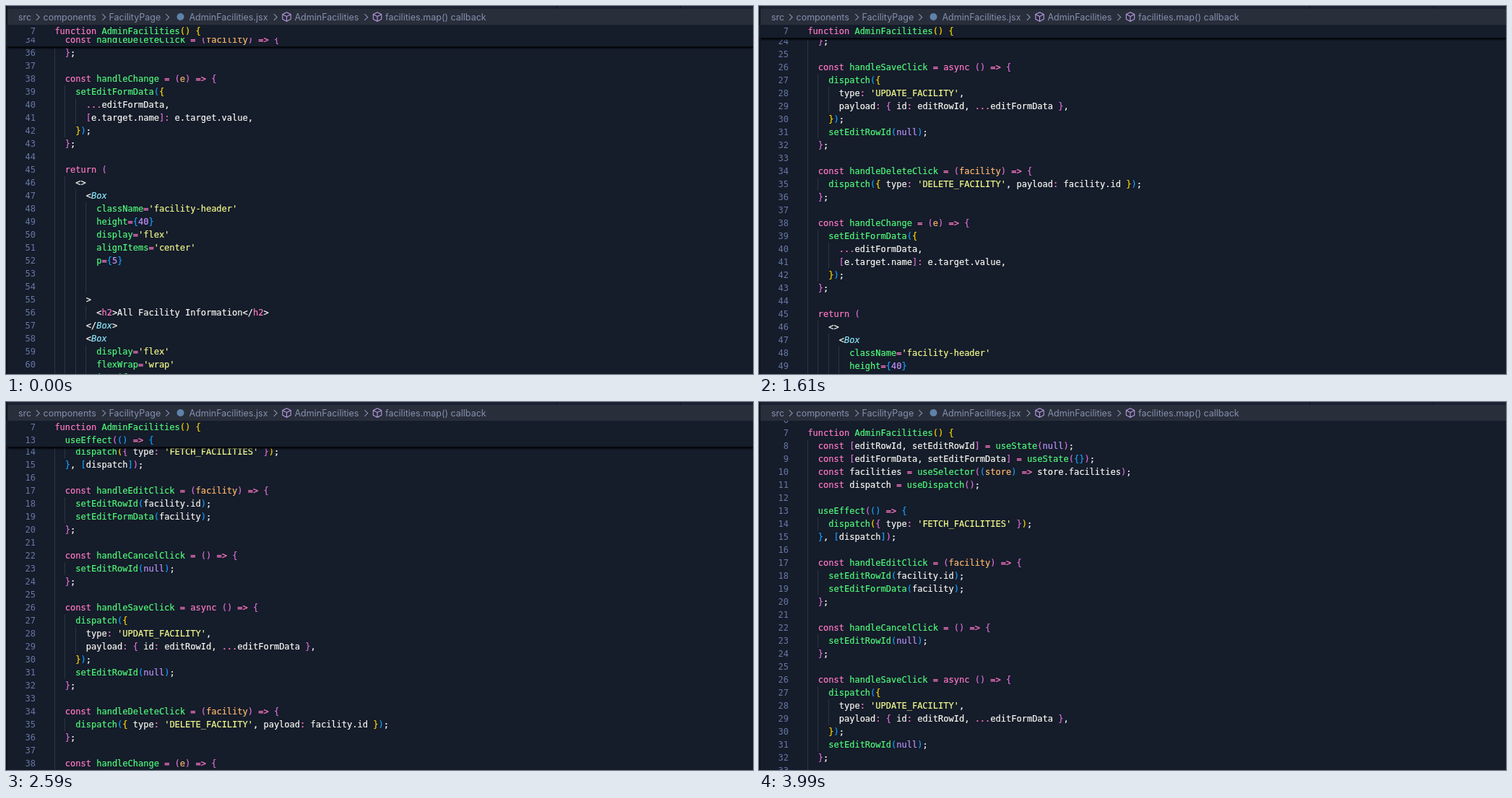
Recreate the animation shown at these times as an HTML page. Size 1034x510 px, loop 4.06 s.

```html
<!DOCTYPE html>
<html lang="en">
<head>
<meta charset="utf-8">
<title>Editor scroll</title>
<style>
html, body { margin: 0; width: 100%; height: 100%; overflow: hidden; background: #151c2a; }
#stage { position: absolute; left: 0; top: 0; width: 1034px; height: 510px; overflow: hidden; background: #151c2a; }
#view { position: absolute; left: 0; top: 26px; right: 0; bottom: 0; overflow: hidden; }
#code, #sticky { position: absolute; left: 0; top: 0; width: 100%; }
#sticky { overflow: hidden; background: #151c2a; }
#shade { position: absolute; left: 3px; right: 0; height: 3px; background: #05070b; box-shadow: 0 1px 2px #05070bcc; }
.row {
  position: absolute; left: 0; width: 100%; height: 18px; background: transparent;
  font: 12px/18px "DejaVu Sans Mono", "Liberation Mono", monospace;
  color: #f8f8f2; white-space: pre; -webkit-text-stroke: .2px;
}
#sticky .row { background: #151c2a; }
#sticky .row i.guide { display: none; }
.num { position: absolute; right: 993px; color: #6679a3; -webkit-text-stroke: 0; }
.src { position: absolute; left: 67.4px; }
.guide { position: absolute; top: 0; width: 1px; height: 18px; background: #2d3544; }
.kw, .op, .tag { color: #ff79c6; }
.fn, .attr { color: #50fa7b; }
.str { color: #f1fa8c; }
.arg { color: #ffb86c; }
.lit { color: #bd93f9; }
.comp { color: #8be9fd; font-style: italic; }
.b0 { color: #ffd700; }
.b1 { color: #da70d6; }
.b2 { color: #179fff; }
#tabs { position: absolute; left: 0; top: 0; width: 100%; height: 4px; background: #1c2231; }
#tabs i { position: absolute; top: 0; width: 1px; height: 4px; background: #10141f; }
#crumbs {
  position: absolute; left: 0; top: 4px; width: 100%; height: 22px; background: #292e3b;
  font: 12.5px/23px Inter, "Liberation Sans", sans-serif; color: #8490ad; white-space: pre;
}
#crumbs span, #crumbs svg { position: absolute; top: 0; }
#crumbs svg { width: 100%; height: 22px; left: 0; fill: none; stroke-width: 1.1; }
#edge { position: absolute; left: 0; top: 0; width: 2px; height: 100%; background: #0e131e; }
</style>
</head>
<body>
<div id="stage">
  <div id="view">
    <div id="code"></div>
    <div id="shade"></div>
    <div id="sticky"></div>
  </div>
  <div id="tabs"><i style="left:762px"></i><i style="left:933px"></i></div>
  <div id="crumbs">
    <svg viewBox="0 0 1034 22">
      <defs>
        <path id="chev" d="M-2.2-4.3 2.2 0-2.2 4.3" stroke="#8490ad"/>
        <path id="cube" d="M0-6.3 5.7-3.5V3.3L0 6.3-5.7 3.3V-3.5ZM-5.7-3.5 0-.6 5.7-3.5M0-.6V6.3" stroke="#b69be0" stroke-linejoin="round"/>
      </defs>
      <use href="#chev" x="44" y="11.5"/><use href="#chev" x="135.500" y="11.5"/>
      <use href="#chev" x="223.500" y="11.5"/><use href="#chev" x="373" y="11.5"/>
      <use href="#chev" x="498.500" y="11.5"/>
      <circle cx="241.500" cy="11" r="5" fill="#5f83a8"/>
      <use href="#cube" x="388.500" y="11"/><use href="#cube" x="514" y="11"/>
    </svg>
    <span style="left:17px">src</span>
    <span style="left:51.5px">components</span>
    <span style="left:142.5px">FacilityPage</span>
    <span style="left:253.5px">AdminFacilities.jsx</span>
    <span style="left:399.5px">AdminFacilities</span>
    <span style="left:525px">facilities.map() callback</span>
  </div>
  <div id="edge"></div>
</div>
<script>
const FIRST = 6, ROW = 18, LOOP = 4060, TICK = 70, NOTCH = 50;
const START = -510; // top of the first line inside the view before scrolling

const text = `
function AdminFacilities() {
  const [editRowId, setEditRowId] = useState(null);
  const [editFormData, setEditFormData] = useState({});
  const facilities = useSelector((store) => store.facilities);
  const dispatch = useDispatch();

  useEffect(() => {
    dispatch({ type: 'FETCH_FACILITIES' });
  }, [dispatch]);

  const handleEditClick = (facility) => {
    setEditRowId(facility.id);
    setEditFormData(facility);
  };

  const handleCancelClick = () => {
    setEditRowId(null);
  };

  const handleSaveClick = async () => {
    dispatch({
      type: 'UPDATE_FACILITY',
      payload: { id: editRowId, ...editFormData },
    });
    setEditRowId(null);
  };

  const handleDeleteClick = (facility) => {
    dispatch({ type: 'DELETE_FACILITY', payload: facility.id });
  };

  const handleChange = (e) => {
    setEditFormData({
      ...editFormData,
      [e.target.name]: e.target.value,
    });
  };

  return (
    <>
      <Box
        className='facility-header'
        height={40}
        display='flex'
        alignItems='center'
        p={5}


      >
        <h2>All Facility Information</h2>
      </Box>
      <Box
        display='flex'
        flexWrap='wrap'
        justifyContent='center'`;

const rules = [
  ['str', /'[^']*'/],
  ['kw', /\b(?:function|const|return|async)\b/],
  ['lit', /\bnull\b|\b\d+\b/],
  ['tag', /\bh2\b/],
  ['comp', /\bBox\b/],
  ['arg', /\b\w+(?=\) =>)/],
  ['fn', /\bhandle\w+|\b\w+(?=\()/],
  ['attr', /\b\w+(?==)/],
  ['op', /=>|=|:|\.{3}/],
  ['open', /[([{]/],
  ['close', /[)\]}]/],
];
const lexer = new RegExp(rules.map(([name, re]) => `(?<${name}>${re.source})`).join('|'), 'g');
const escape = s => s.replace(/&/g, '&amp;').replace(/</g, '&lt;');

let depth = 0;
function paint(line) {
  let out = '', at = 0;
  for (const m of line.matchAll(lexer)) {
    let kind = rules.find(([name]) => m.groups[name] !== undefined)[0];
    if (kind === 'open') kind = 'b' + depth++ % 3;
    if (kind === 'close') kind = 'b' + --depth % 3;
    out += escape(line.slice(at, m.index)) + `<span class="${kind}">${escape(m[0])}</span>`;
    at = m.index + m[0].length;
  }
  return out + escape(line.slice(at));
}

const $ = id => document.getElementById(id);
const code = $('code'), sticky = $('sticky'), shade = $('shade');
const rows = new Map();
let level = 0;
text.split('\n').forEach((line, i) => {
  // blank lines keep the guides of the line above
  if (line) level = line.search(/\S/) / 2;
  const row = document.createElement('div');
  row.className = 'row';
  row.style.top = i * ROW + 'px';
  let guides = '';
  for (let k = 0; k < level; k++) guides += `<i class="guide" style="left:${Math.round(67 + k * 14.45)}px"></i>`;
  row.innerHTML = `${guides}<span class="num">${FIRST + i}</span><span class="src">${paint(line)}</span>`;
  code.append(row);
  rows.set(FIRST + i, row);
});

// foldable scopes: first line, last line, nesting
const scopes = [[7, 99, 0], [13, 14, 1], [17, 19, 1], [22, 23, 1], [26, 31, 1], [34, 35, 1], [38, 42, 1]]
  .map(([from, to, nest]) => {
    const row = rows.get(from).cloneNode(true);
    row.style.zIndex = 2 - nest;
    sticky.append(row);
    return { from, to, nest, row };
  });

// ticks at which the wheel turns one notch
const wheel = [3, 7, 13, 20, 26, 31, 34, 36, 44, 52];

function draw(now) {
  const tick = Math.floor(now % LOOP / TICK);
  const top = START + NOTCH * wheel.filter(t => t <= tick).length;
  const lineTop = n => top + (n - FIRST) * ROW;
  let height = 0;
  code.style.top = top + 'px';
  for (const { from, to, nest, row } of scopes) {
    const slot = nest * ROW, end = lineTop(to + 1);
    const on = slot > lineTop(from) && slot <= end;
    const y = Math.min(slot, end - ROW);
    row.style.display = on ? '' : 'none';
    row.style.top = y + 'px';
    if (on) height = Math.max(height, y + ROW);
  }
  sticky.style.height = height + 'px';
  shade.style.top = height - 1 + 'px';
  shade.style.display = height ? '' : 'none';
}

const begin = performance.now();
function loop() {
  draw(performance.now() - begin);
  requestAnimationFrame(loop);
}
loop();
</script>
</body>
</html>
```
